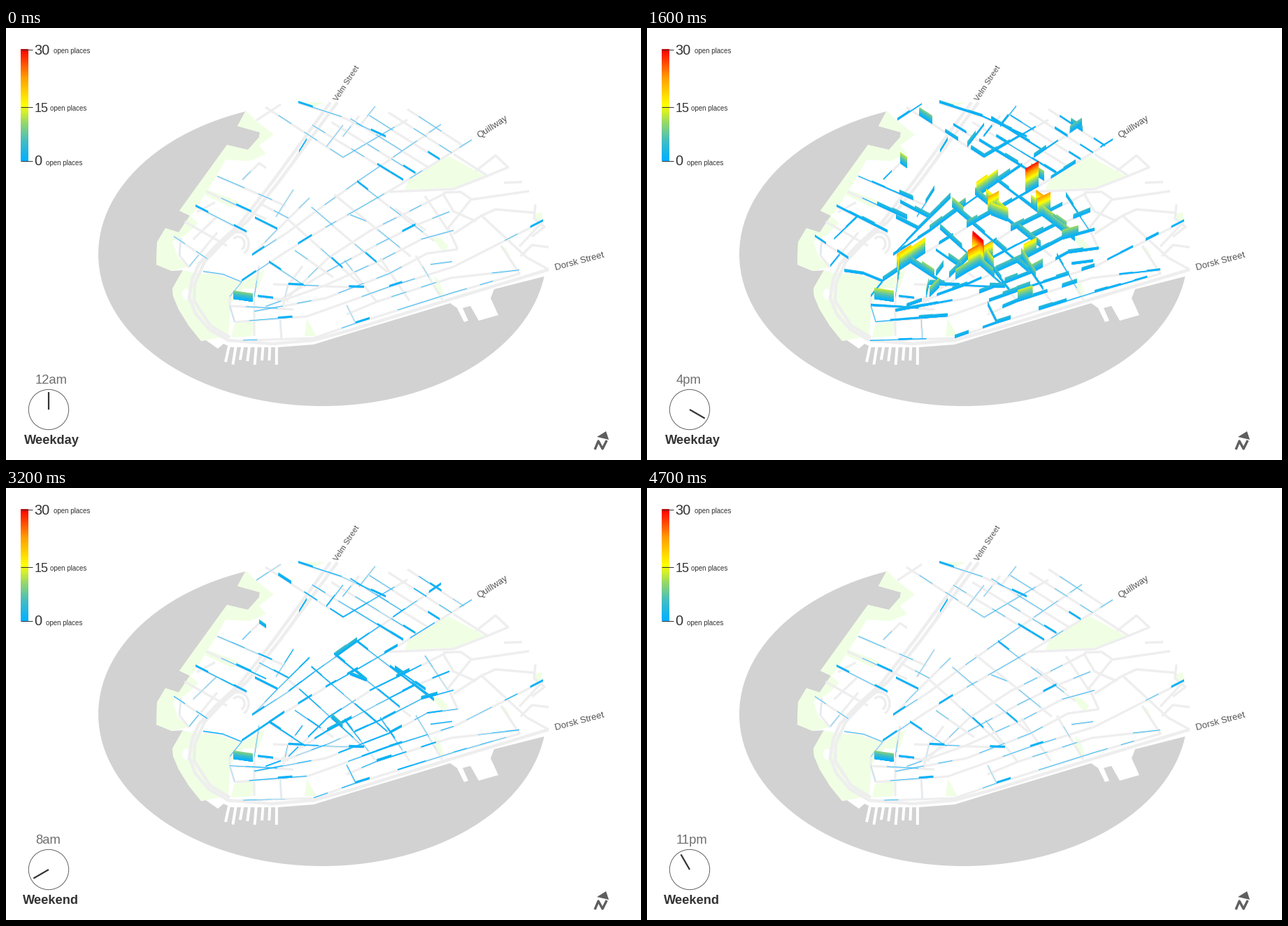
These frames come from a looping animation (908x617 px, 4800 ms). A matplotlib script:

```python
import math
import random

import numpy as np
import matplotlib.pyplot as plt
from matplotlib.animation import FuncAnimation
from matplotlib.collections import LineCollection, PolyCollection
from matplotlib.colors import LinearSegmentedColormap
from matplotlib.patches import Circle, Ellipse, Polygon

W, H, DPI = 908, 617, 100
PT = 72 / DPI
FULL = 36          # bar height in pixels that reaches pure red
WATER, PARK, ROAD, INK = "#d2d2d2", "#f0ffe3", "#eeeeef", "#333333"

HEAT = LinearSegmentedColormap.from_list("heat", [
    (0, "#00b0ff"), (.18, "#45bdc0"), (.34, "#98d866"),
    (.5, "#ffff00"), (.75, "#ff9c00"), (1, "#ff0000")])

WEST_COAST = [
    (343, 118), (331, 140), (363, 149), (362, 156), (346, 174), (316, 167),
    (248, 261), (263, 268), (247, 292), (228, 286), (216, 306), (215, 338),
    (237, 347), (253, 346), (238, 372), (239, 383), (247, 402), (262, 426),
    (279, 447)]
EAST_COAST = [
    (286, 446), (303, 458), (311, 451), (322, 456), (388, 456), (440, 452),
    (495, 435), (635, 393), (645, 400), (655, 420), (661, 418), (653, 400),
    (664, 397), (676, 418), (704, 410), (693, 386), (698, 373), (773, 354),
    (W, 354), (W, 0), (343, 0)]

PARKS = [
    WEST_COAST[:8] + [(268, 264), (300, 213), (314, 188), (348, 190),
                      (372, 180), (362, 168), (383, 152), (357, 132)],
    WEST_COAST[7:13] + [(262, 341), (246, 328), (238, 305), (256, 296),
                        (275, 279)],
    WEST_COAST[13:] + [(318, 440), (321, 395), (340, 372), (361, 372),
                       (370, 345), (337, 364), (300, 352), (268, 350)],
    [(570, 231), (576, 216), (633, 183), (686, 212), (640, 228)],
    [(322, 442), (326, 423), (355, 418), (352, 440)],
    [(430, 415), (444, 440), (427, 440)],
    [(607, 298), (621, 300), (632, 311), (626, 321)],
    [(612, 354), (619, 360), (627, 384), (616, 379)],
    [(707, 312), (715, 314), (722, 328)],
    [(756, 266), (766, 263), (767, 275), (757, 277)],
    [(428, 106), (456, 106), (440, 113)],
    [(288, 231), (330, 247), (335, 253), (322, 256), (285, 239)],
]

HIGHWAYS = [
    [(464, 106), (383, 217), (335, 279), (300, 311), (276, 337), (266, 359),
     (262, 385), (271, 408), (290, 430), (318, 446), (380, 451), (440, 446),
     (494, 431), (640, 386), (776, 345)],
    [(474, 106), (392, 217), (345, 276), (310, 306), (284, 334), (270, 365),
     (269, 390), (292, 425), (320, 442)],
]
QUIET_ROADS = [
    [(548, 234), (640, 230), (684, 213), (718, 199), (700, 182), (672, 204)],
    [(640, 180), (690, 212)], [(712, 221), (738, 220)],
    [(625, 235), (650, 234), (666, 245), (700, 240), (748, 233)],
    [(625, 237), (640, 262), (672, 276)], [(664, 246), (632, 286)],
    [(640, 294), (680, 268), (700, 259), (757, 264)],
    [(680, 268), (745, 328), (776, 345)],
    [(757, 252), (755, 272), (770, 284), (752, 298)],
    [(708, 311), (735, 352)], [(734, 312), (768, 276)],
    [(736, 326), (752, 310), (776, 313)], [(632, 286), (646, 316)],
]


def fan(first, last, n):
    """Streets spread evenly between two of the same shape."""
    a, b = np.array(first, float), np.array(last, float)
    return [a + (b - a) * t for t in np.linspace(0, 1, n)]


STREETS = [
    # north
    *fan([(438, 139), (568, 218)], [(574, 116), (655, 169)], 6),
    *fan([(482, 185), (574, 131)], [(502, 220), (622, 138)], 2),
    *fan([(458, 170), (482, 139)], [(505, 141), (528, 112)], 3),
    [(371, 113), (482, 185)], [(418, 107), (480, 127), (543, 156)],
    [(358, 132), (393, 109)], [(408, 195), (430, 160)],
    # west
    *fan([(302, 212), (400, 254)], [(240, 298), (288, 330)], 5),
    *fan([(273, 263), (299, 249)], [(262, 341), (302, 292)], 3),
    *fan([(362, 250), (404, 272)], [(356, 272), (388, 288)], 2),
    [(338, 217), (362, 193), (372, 200)], [(386, 270), (411, 231)],
    [(250, 300), (248, 325), (262, 342)], [(282, 348), (310, 352), (337, 363)],
    # core
    [(666, 160), (560, 226), (503, 259), (457, 285), (398, 321), (337, 362)],
    [(502, 220), (440, 264), (404, 291), (352, 325)],
    [(352, 325), (388, 288), (434, 243)],
    *fan([(628, 236), (577, 262), (520, 290), (460, 329), (404, 384)],
         [(646, 316), (602, 322), (548, 351), (457, 386), (355, 405)], 4),
    *fan([(502, 220), (612, 304)], [(404, 274), (512, 371)], 4),
    *fan([(413, 318), (468, 356)], [(376, 335), (428, 369)], 2),
    *fan([(556, 258), (600, 289)], [(492, 267), (515, 276)], 2),
    *fan([(586, 325), (624, 388)], [(484, 332), (530, 391)], 3),
    [(599, 240), (632, 289)], [(607, 338), (638, 334)],
    # south
    *fan([(768, 276), (640, 341), (548, 370), (430, 412), (327, 420)],
         [(734, 351), (640, 378), (500, 422), (440, 443), (319, 447)], 2),
    [(734, 346), (636, 357), (530, 391), (487, 409)], [(487, 396), (500, 422)],
    *fan([(382, 366), (512, 371)], [(320, 397), (411, 402)], 2),
    [(360, 384), (404, 389)], [(395, 402), (403, 368), (424, 340)],
    [(337, 363), (320, 384), (320, 397), (327, 420)],
    [(362, 340), (355, 385), (355, 440)], [(392, 416), (394, 446)],
]

# x, y, weekday peak, weekend peak
HOTSPOTS = [
    (556, 228, 44, 13), (567, 264, 29, 15), (486, 232, 31, 31),
    (497, 263, 27, 9), (508, 275, 21, 14), (448, 270, 20, 7),
    (412, 297, 16, 5), (362, 345, 31, 8), (388, 328, 22, 9),
    (404, 341, 24, 8), (452, 346, 19, 9), (476, 340, 44, 18),
    (408, 378, 15, 5), (548, 330, 24, 8), (604, 307, 19, 17),
    (545, 385, 19, 12), (405, 136, 16, 15), (415, 184, 19, 17),
    (362, 195, 18, 17), (462, 172, 13, 9), (592, 191, 14, 10),
    (552, 348, 14, 10), (592, 284, 13, 11), (608, 147, 12, 9),
]
rng = random.Random(11)


def hot(x, y, col):
    return max(s[col] * math.exp(-math.hypot(x - s[0], y - s[1]) ** 2 / 220)
               for s in HOTSPOTS)


def blocks(street, size=21):
    """Cut a street into blocks: ends, then night, weekday, weekend heights."""
    for p, q in zip(np.array(street[:-1]), np.array(street[1:])):
        n = max(1, round(math.hypot(*(q - p)) / size))
        for i in range(n):
            a, b = p + (q - p) * i / n, p + (q - p) * (i + 1) / n
            x, y = (a + b) / 2
            core = math.exp(-((x - 490) / 150) ** 2 - ((y - 290) / 125) ** 2)
            roll, size_roll = rng.random(), rng.random()
            if roll > .6 + .35 * core:
                continue
            night = 3 if roll < .05 + .1 * core else .8 if roll < .5 else 0
            base = .8 + size_roll * (2.5 + 7 * core) + 1.5 * core
            yield (*a, *b, night, max(night, base, hot(x, y, 2)),
                   max(night, .62 * base, hot(x, y, 3)))


BARS = [bar for street in STREETS for bar in blocks(street)]
BARS.append((325, 387, 353, 391, 12, 16, 12))    # open all night
BARS.sort(key=lambda b: b[1] + b[3])


def height(bar, hour, weekend):
    night, day = bar[4], bar[6 if weekend else 5]
    share = np.interp(hour, [0, 4, 6, 8, 10, 12, 17, 19, 21, 23],
                      [0, 0, .1, .36, .75, 1, 1, .75, .3, 0])
    return night + (day - night) * share


def wall(x1, y1, x2, y2, top, full):
    """Nested quads, tallest first, give a vertical heat gradient."""
    steps = np.linspace(top, 0, math.ceil(top / 1.5), endpoint=False)
    quads = [[(x1, y1), (x2, y2), (x2, y2 - h), (x1, y1 - h)] for h in steps]
    return quads, [max(0, h - 1.5) / full for h in steps]


def bar_faces(hour, weekend):
    quads, levels = [], []
    for bar in BARS:
        top = height(bar, hour, weekend)
        if top > .3:
            q, v = wall(*bar[:4], top, FULL)
            quads += q
            levels += v
    return quads, HEAT(np.clip(levels, 0, 1))


fig = plt.figure(figsize=(W / DPI, H / DPI), dpi=DPI, facecolor="white")
ax = fig.add_axes([0, 0, 1, 1])
ax.set_xlim(0, W)
ax.set_ylim(H, 0)
ax.axis("off")


def label(x, y, text, size, color=INK, ha="left", va="baseline", **kw):
    return ax.text(x, y, text, fontsize=size * PT, color=color, ha=ha, va=va,
                   family="Liberation Sans", zorder=5, **kw)


def strokes(lines, width, color=ROAD, z=2):
    ax.add_collection(LineCollection(lines, linewidths=width * PT, colors=color,
                                     capstyle="butt", joinstyle="round", zorder=z))


def fill(points, color):
    ax.add_patch(Polygon(points, fc=color, lw=0))


# Base map
ax.add_patch(Ellipse((452.5, 323), 641, 434, fc=WATER, lw=0))
fill(WEST_COAST + EAST_COAST, "white")
strokes([[(319 + 9.7 * i, 454), (314 + 10.4 * i, 477 + 4 * math.sin(2 * i))]
         for i in range(8)], 4, "white", 1)
for park in PARKS:
    fill(park, PARK)
ax.add_patch(Ellipse((257, 380), 10, 16, fc="white", lw=0))
strokes(HIGHWAYS, 4.5)
strokes(QUIET_ROADS, 3.4)
strokes(STREETS, 3.2)
for r in (9, 15):
    turn = np.linspace(-2.4, 1, 20)
    strokes([np.c_[332 + r * np.cos(turn), 308 + 1.1 * r * np.sin(turn)]], 3.4)

bars = PolyCollection([], linewidths=0, zorder=3)
ax.add_collection(bars)

for x, y, name, size, tilt in ((487, 79, "Velm Street", 11.2, 57),
                               (696, 141, "Quillway", 13, 33),
                               (820, 334, "Dorsk Street", 13, 15)):
    label(x, y, name, size, "#555555", "center", "center",
          rotation=tilt, rotation_mode="anchor")

# Legend
quads, levels = wall(21, 189.5, 32, 189.5, 159.5, 158)
ax.add_collection(PolyCollection(quads, facecolors=HEAT(levels), linewidths=0))
for y, count, x in ((30, "30", 68), (112, "15", 63), (189, "0", 57)):
    strokes([[(21, y + .5), (38, y + .5)]], 1, INK, 4)
    label(40.5, y + 7.5, count, 20 if count != "15" else 18)
    label(x, y + 6.5, "open places", 9.8)

# Compass
fill([(845, 584), (858, 576), (862, 588)], "#5f5f5f")
strokes([[(842, 602), (847, 590), (853, 601), (859, 589)]], 3.4, "#5f5f5f")

# Clock
ax.add_patch(Circle((61, 545), 28.7, fc="none", ec="#555555", lw=.9 * PT))
hand, = ax.plot([], [], color=INK, lw=2.2 * PT, solid_capstyle="butt")
clock = label(42, 508.5, "", 18.5, "#707070")
day_name = label(65, 594, "", 18.3, ha="center", weight="bold")


def draw(i):
    weekend, hour = divmod(i, 24)
    quads, colors = bar_faces(hour, weekend)
    bars.set_verts(quads)
    bars.set_facecolor(colors)
    turn = math.radians(hour * 30)
    hand.set_data([61, 61 + 25 * math.sin(turn)], [545, 545 - 25 * math.cos(turn)])
    clock.set_text(f"{hour % 12 or 12}{'pm' if hour > 11 else 'am'}")
    day_name.set_text("Weekend" if weekend else "Weekday")
    day_name.set_x(63.5 if weekend else 65)
    return bars, hand, clock, day_name


anim = FuncAnimation(fig, draw, frames=48, interval=100, repeat=True,
                     repeat_delay=0, blit=False)
plt.show()
```
